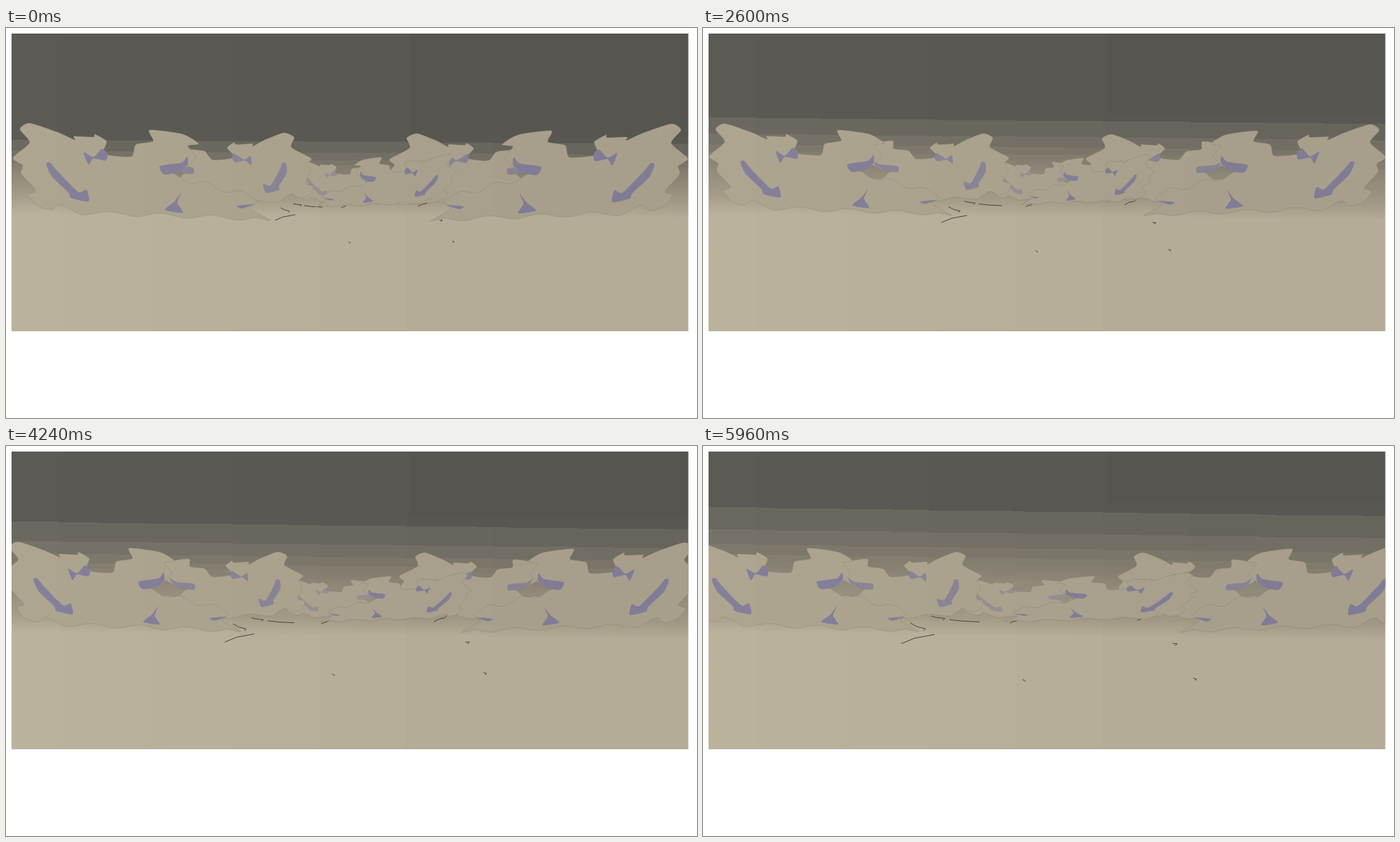
An HTML page with a canvas that plays this animation: 996 by 562 pixels, repeating every 6000 ms.

```html
<!DOCTYPE html>
<html lang="en">
<head>
<meta charset="utf-8">
<title>Parting rocks</title>
<style>
html, body { margin: 0; width: 100%; height: 100%; overflow: hidden; background: #fff; }
canvas { display: block; }
</style>
</head>
<body>
<canvas id="stage" width="996" height="562"></canvas>
<script>
const ctx = document.getElementById('stage').getContext('2d');
const LOOP = 6000, STEP = 40;
const LEFT = 8, TOP = 8, WIDTH = 975.5, HEIGHT = 429;
const MIRROR = 993;

const mix = (a, b, k) => a + (b - a) * k;
const pts = text => text.trim().split(/\s+/).map(p => p.split(',').map(Number));

// Points of y = f(x) from one x to another.
function wave(from, to, count, f) {
  return Array.from({ length: count + 1 }, (_, i) => {
    const x = mix(from, to, i / count);
    return [x, f(x)];
  });
}

// One rock, reused at several sizes: key points for the crest and the flank,
// waves for the crack and the foot.
const outline = [
  ...pts(`34,137 74,150 99,161 98,156 126,157 128,153 145,163 141,176 147,183 181,185
    187,168 212,163 207,147 255,153 278,167 262,170 274,186 257,203 241,210`),
  ...wave(244, 352, 14, x => 213 + 0.26 * (x - 240) + 4 * Math.sin(x / 8)),
  ...pts('362,250 352,260 381,277'),
  ...wave(360, 106, 22, x => 266 + 0.035 * (x - 112) + 3 * Math.cos((x - 112) / 11.8)),
  ...pts('78,254 65,262 45,256 32,240 43,234 22,210 24,198 10,187 34,165 20,146')
];

const marks = [
  '58,196 64,194 74,206 104,236 116,233 119,250 94,245 90,237 66,214',
  '112,179 126,186 138,174 146,181 144,191 126,188 119,197',
  '222,199 253,194 261,185 262,197 250,207 228,211',
  '253,237 247,252 255,266 229,262 243,250',
  '333,256 358,254 340,260'
].map(pts);

// Thin scraps on the sand: start x, y and the run of the stroke.
const scraps = pts(`388,277,29,-8 396,259,13,5 414,253,12,2 430,256,26,2 483,259,6,-2
  594,257,11,-4 494,308,2,2 643,307,3,1 625,277,4,0`);

function trace(points) {
  const n = points.length, at = i => points[(i + n) % n];
  ctx.beginPath();
  ctx.moveTo(...points[0]);
  for (let i = 0; i < n; i++) {
    const [a, b, c, d] = [at(i - 1), at(i), at(i + 1), at(i + 2)];
    ctx.bezierCurveTo(b[0] + (c[0] - a[0]) / 9, b[1] + (c[1] - a[1]) / 9,
      c[0] - (d[0] - b[0]) / 9, c[1] - (d[1] - b[1]) / 9, c[0], c[1]);
  }
  ctx.closePath();
}

function placed(draw) {
  ctx.save();
  draw();
  ctx.restore();
}

function zoom(sx, sy, x, y) {
  ctx.translate(x, y);
  ctx.scale(sx, sy);
  ctx.translate(-x, -y);
}

function rock(tint) {
  trace(outline);
  ctx.fillStyle = '#ada590';
  ctx.fill();
  placed(() => {
    ctx.resetTransform();
    ctx.strokeStyle = 'rgba(122,114,96,.4)';
    ctx.lineWidth = 0.7;
    ctx.stroke();
  });
  ctx.fillStyle = '#85809a';
  ctx.globalAlpha = tint;
  for (const mark of marks) {
    trace(mark);
    ctx.fill();
  }
  ctx.globalAlpha = 1;
}

// Calls draw(x, width, i) for the upright strips of the stage.
function strips(draw) {
  for (let i = 0; i < 9; i++) {
    const x = i ? 76 + 125 * (i - 1) : LEFT;
    draw(x, 76 + 125 * i - x, i);
  }
}

function sky(p) {
  const grad = ctx.createLinearGradient(0, 0, 0, 440);
  const stop = (y, color) => grad.addColorStop(y / 440, color);
  const haze = mix(210, 185, p);
  let last = 0;
  for (let k = 0; k < 6; k++) {
    const y = haze - mix(49, 97, p) * 0.67 ** k;
    const [r, g, b] = [[147, 56], [139, 49], [123, 39]].map(([to, d]) => Math.round(to - d * 0.71 ** k));
    stop(last, `rgb(${r},${g},${b})`);
    stop(y, `rgb(${r},${g},${b})`);
    last = y;
  }
  stop(haze + 5, '#938b7b');
  stop(242, '#a59d88');
  stop(268, '#bbb29c');

  const tilt = mix(6, 13, p), slope = tilt / 2 / WIDTH;
  ctx.fillStyle = grad;
  strips((x, w, i) => placed(() => {
    ctx.transform(1, slope, 0, 1, 0, tilt * i / 15 - LEFT * slope);
    ctx.fillRect(x, -40, w, 520);
  }));
  ctx.fillStyle = 'rgba(0,0,0,.025)';
  ctx.fillRect(582, TOP, 402, mix(157, 80, p) - TOP);
}

function debris(p) {
  const grow = 1 + 0.65 * p;
  placed(() => {
    zoom(grow, grow, 545, 265);
    ctx.strokeStyle = '#46443f';
    ctx.lineWidth = 1 / grow;
    scraps.forEach(([x, y, dx, dy], i) => {
      const bend = Math.sin(i) * 2;
      ctx.beginPath();
      ctx.moveTo(x, y);
      ctx.lineTo(x + dx * 0.4, y + dy * 0.6);
      ctx.lineTo(x + dx, y + dy);
      ctx.lineTo(x + dx - bend, y + dy + bend);
      ctx.stroke();
    });
  });
}

function render(ms) {
  const t = ms / 1000, p = t / 5.96;
  const shrink = Math.min(t, 3.4) / 3.4;       // first the rocks settle
  const part = Math.max(0, t - 3.4) / 2.56;    // then the two sides part
  const near = 1 - 0.075 * shrink, far = 1 - 0.08 * shrink;

  const pair = draw => {
    placed(() => {
      ctx.translate(-40 * part, 0);
      draw();
    });
    placed(() => {
      ctx.translate(MIRROR + 46.5 * part, 1);
      ctx.scale(-1, 1);
      draw();
    });
  };

  ctx.fillStyle = '#fff';
  ctx.fillRect(0, 0, 996, 562);
  placed(() => {
    ctx.beginPath();
    ctx.rect(LEFT, TOP, WIDTH, HEIGHT);
    ctx.clip();
    sky(p);
    placed(() => {
      zoom(1 + 0.35 * part, 1, 540, 0);
      zoom(far, far, 420, 200);
      ctx.transform(0.52, 0, 0, 0.48, 401, 122);
      rock(0.5);
    });
    pair(() => {
      zoom(far, far, 455, 170);
      ctx.transform(-0.828, 0.02, 0.398, 0.75, 373.9, 47.5);
      rock(0.8);
    });
    debris(p);
    placed(() => {
      zoom(1 + 0.5 * part, 1, 523, 0);
      zoom(far, far, 660, 200);
      ctx.transform(-0.55, 0, 0, 0.55, 655, 105.6);
      rock(1);
    });
    pair(() => {
      zoom(near, near, -13, 149);
      rock(1);
    });
    // the light falls off to the right
    strips((x, w, i) => {
      ctx.fillStyle = `rgba(0,0,0,${Math.min(0.035, i * 0.006)})`;
      ctx.fillRect(x, TOP, w, HEIGHT);
    });
  });
}

function tick(now) {
  render(Math.floor((now % LOOP) / STEP) * STEP);
  requestAnimationFrame(tick);
}
render(0);
requestAnimationFrame(tick);
</script>
</body>
</html>
```
